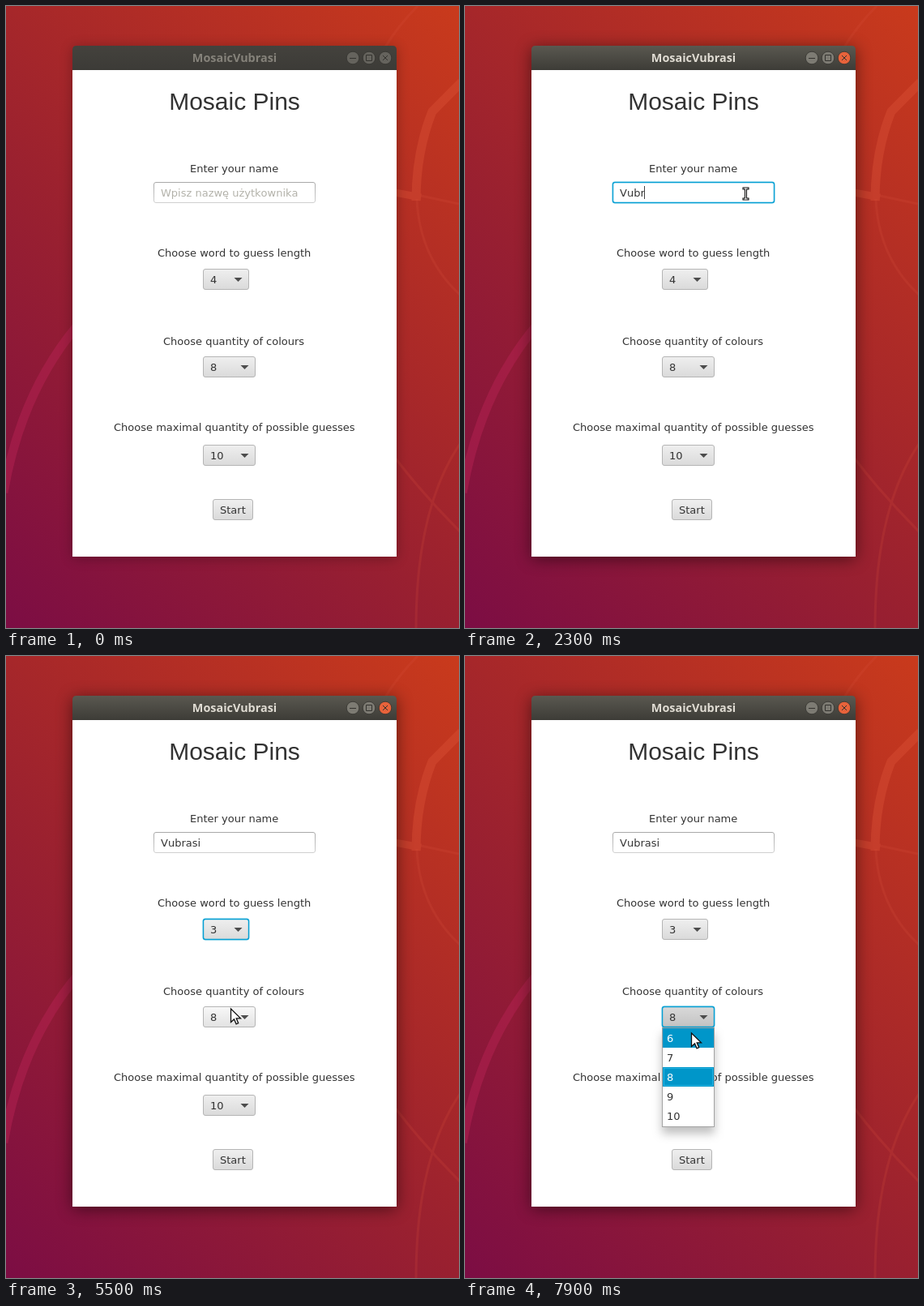
An HTML page that plays this animation: 559x767 px, repeating every 8000 ms.

```html
<!DOCTYPE html>
<html lang="en">
<head>
<meta charset="utf-8">
<title>Game setup</title>
<style>
html, body { margin: 0; width: 100%; height: 100%; overflow: hidden; }
body { background: linear-gradient(45deg, #7c0d44, #992030 42%, #a6272a 58%, #c93a1c); }
svg { display: block; }
text { font: 13px "DejaVu Sans", sans-serif; font-kerning: none; white-space: pre; }
.head { font: 30px "Liberation Sans", Arial, sans-serif; }
.title { font: bold 14.4px "Noto Sans", "Open Sans", sans-serif; }
.head, .title { text-anchor: middle; }
.drop { filter: drop-shadow(0 8px 6px rgba(0,0,0,.25)); }
</style>
</head>
<body>
<svg width="559" height="767" viewBox="0 0 559 767">
  <defs id="defs"></defs>
  <g fill="none">
    <path d="M88 394Q18 478-3 600" stroke="#b62252" stroke-width="11" opacity=".5"/>
    <g stroke="#e0563a" opacity=".36">
      <path d="M562 94L526 130Q506 180 506 240" stroke-width="11"/>
      <path d="M480 230L512 236" stroke-width="9"/>
    </g>
    <g stroke="#d8503c" stroke-width="3" opacity=".2">
      <path d="M508 0Q484 24 467 52"/>
      <path d="M512 234L559 244"/>
      <path d="M507 238Q510 310 560 356"/>
      <path d="M480 557Q516 604 560 648"/>
      <path d="M560 540Q506 620 506 767"/>
    </g>
  </g>
  <g id="ui"></g>
</svg>
<script>
const LOOP = 8000, STEP = 100, BLUE = '#039ed3', MID = 282;
const ui = document.getElementById('ui');
const pen = document.createElement('canvas').getContext('2d');
pen.font = '13px "DejaVu Sans", sans-serif';
pen.fontKerning = 'none';
const widthOf = s => pen.measureText(s).width;

const SKINS = {
  barOn: ['#5a5850', '#3d3c37'], barOff: ['#44423d', '#3c3b37'],
  idle: ['#efefef', '#dadada'], hover: ['#f8f8f8', '#e2e2e2'],
  down: ['#d9d9d9', '#c3c3c3'], edge: ['#a9a9a9', '#cfcfcf']
};
document.getElementById('defs').innerHTML = Object.entries(SKINS).map(([id, [top, end]]) =>
  `<linearGradient id="${id}" x2="0" y2="1"><stop stop-color="${top}"/><stop offset="1" stop-color="${end}"/></linearGradient>`
).join('');

const NAME = 'Vubrasi';
const KEYS = [1300, 1700, 1900, 2300, 2500, 2600, 2800];
const FOCUS = 800, OPEN1 = 4600, PICK1 = 5300, FOCUS2 = 5900, OPEN2 = 7500;

// pointer moves: begin, end, x, y; it rests in between
const MOVES = [
  [100, 700, 346, 230], [800, 900, 346, 231],
  [3600, 3800, 364, 262], [3800, 4100, 300, 357], [4100, 4300, 273, 334],
  [4600, 4900, 263, 364], [5000, 5100, 287, 374],
  [5300, 5500, 277, 434], [5500, 5700, 281, 443], [5800, 6000, 283, 460],
  [6200, 6600, 287, 447], [6700, 6800, 282, 449], [6900, 7200, 294, 447],
  [7700, 7900, 279, 464]
];

function pointerAt(t) {
  let x = 586, y = 270;
  for (const [from, to, x1, y1] of MOVES) {
    const p = Math.min(1, Math.max(0, (t - from) / (to - from)));
    x += (x1 - x) * p;
    y += (y1 - y) * p;
  }
  return [Math.round(x), Math.round(y)];
}

const inside = ([px, py], x, y, w, h) => px >= x && px < x + w && py >= y && py < y + h;

const text = (s, x, y, fill = '#333', cls = '') =>
  `<text x="${x}" y="${y}" class="${cls}" fill="${fill}">${s}</text>`;

const label = (s, y) => text(s, Math.floor(MID - widthOf(s) / 2), y);

const box = (x, y, w, h, fill, stroke = 'none', more = '') =>
  `<rect x="${x}" y="${y}" width="${w}" height="${h}" fill="${fill}" stroke="${stroke}" ${more}/>`;

function control(x, y, w, fill, focused, edge = '#b5b5b5') {
  const glow = focused ? box(x, y, w, 26, 'none', BLUE, 'rx="3.5" stroke-width="2.4" opacity=".18"') : '';
  return glow + box(x + .5, y + .5, w - 1, 25, fill, focused ? BLUE : edge,
    `rx="2.5" stroke-width="${focused ? 1.4 : 1}"`);
}

function combo(y, w, value, ptr, focused, open) {
  const x = 243, skin = open ? 'down' : inside(ptr, x, y, w, 26) ? 'hover' : 'idle';
  return control(x, y, w, `url(#${skin})`, focused) + text(value, x + 9, y + 18) +
    `<path d="M${x + w - 18.5} ${y + 11}h10l-5 5z" fill="#4c4c4c"/>`;
}

function popup(y, w, first, last, chosen, ptr) {
  const x = 243;
  let out = box(x + .5, y + .5, w - 1, (last - first + 1) * 24 + 2, '#fff', '#a3a3a3', 'class="drop"');
  for (let n = first; n <= last; n++) {
    const top = y + 1 + (n - first) * 24;
    const lit = n === chosen || inside(ptr, x, top, w, 24);
    if (lit) out += box(x + 1, top, w - 2, 24, '#0096c9');
    if (n === chosen) out += box(x + 2.5, top + 1.5, w - 5, 21, 'none', '#2cb8e6', 'stroke-width=".8"');
    out += text(n, x + 6, top + 17, lit ? '#fff' : '#333');
  }
  return out;
}

function frame(active) {
  const grey = active ? '#7d7b73' : '#65635d';
  const button = (x, glyph, fill = grey) =>
    `<g transform="translate(${x} 64)" stroke="#34332f"><circle r="7.8" fill="${fill}" stroke-width=".8"/>` +
    `<path d="${glyph}" fill="none"/></g>`;
  const shade = active ? 'style="filter:blur(10px)" opacity=".5"' : 'style="filter:blur(8px)" opacity=".28"';
  return box(82, active ? 52 : 51, 400, 630, '#000', 'none', shade) +
    `<path d="M82 79V54q0-5 5-5H477q5 0 5 5V79z" fill="url(#bar${active ? 'On' : 'Off'})"/>` +
    box(82, 79, 400, 600, '#fff') +
    text('MosaicVubrasi', MID, 69, active ? '#dfdbd2' : '#85827a', 'title') +
    button(428, 'M-4 .5H4') +
    button(448, 'M-3.5-3.5H3.5V3.5H-3.5z') +
    button(468, 'M-3-3L3 3M3-3L-3 3', active ? '#e8633b' : grey);
}

function field(t) {
  const focused = t >= FOCUS && t < OPEN1;
  const typed = NAME.slice(0, KEYS.filter(k => k <= t).length);
  let out = control(182, 217, 200, '#fff', focused, 'url(#edge)') +
    (t < FOCUS ? text('Wpisz nazwę użytkownika', 191, 235, '#b3b2aa') : text(typed, 191, 235));
  const last = typed ? KEYS[typed.length - 1] : FOCUS;
  if (focused && Math.floor((t - last) / 500) % 2 === 0) {
    out += `<path d="M${Math.round(191 + widthOf(typed)) - .5} 222V238" stroke="#444"/>`;
  }
  return out;
}

function pointer(ptr) {
  const at = `transform="translate(${ptr[0] + .5} ${ptr[1] + .5})"`;
  if (inside(ptr, 182, 217, 200, 26)) {
    const beam = 'M-2.5-6.5H2.5M0-6.5V6.5M-2.5 6.5H2.5';
    return `<g ${at} fill="none" stroke-linecap="square"><path d="${beam}" stroke="#000" stroke-width="3"/>` +
      `<path d="${beam}" stroke="#fff"/></g>`;
  }
  return `<path ${at} d="M0 .5V17L4 13.4 6.6 19.3 9.2 18.2 6.7 12.3H12z" fill="#fff" stroke="#111" stroke-width="1.3"/>`;
}

function draw(t) {
  const ptr = pointerAt(t);
  const open1 = t >= OPEN1 && t < PICK1, open2 = t >= OPEN2;
  ui.innerHTML = frame(t >= FOCUS) +
    text('Mosaic Pins', MID, 128, '#333', 'head') +
    label('Enter your name', 205) +
    field(t) +
    label('Choose word to guess length', 309) +
    combo(324, 57, t < PICK1 ? 4 : 3, ptr, t >= OPEN1 && t < FOCUS2, open1) +
    label('Choose quantity of colours', 418) +
    combo(432, 65, 8, ptr, t >= FOCUS2, open2) +
    label('Choose maximal quantity of possible guesses', 524) +
    combo(541, 65, 10, ptr) +
    control(255, 608, 50, 'url(#idle)') + text('Start', 264, 626) +
    (open1 ? popup(350, 57, 3, 5, 4, ptr) : '') +
    (open2 ? popup(458, 65, 6, 10, 8, ptr) : '') +
    pointer(ptr);
}

let start, shown = -1;
function tick(now) {
  start ??= now;
  const t = Math.floor((now - start) % LOOP / STEP) * STEP;
  if (t !== shown) draw(shown = t);
  requestAnimationFrame(tick);
}
draw(0);
requestAnimationFrame(tick);
</script>
</body>
</html>
```
